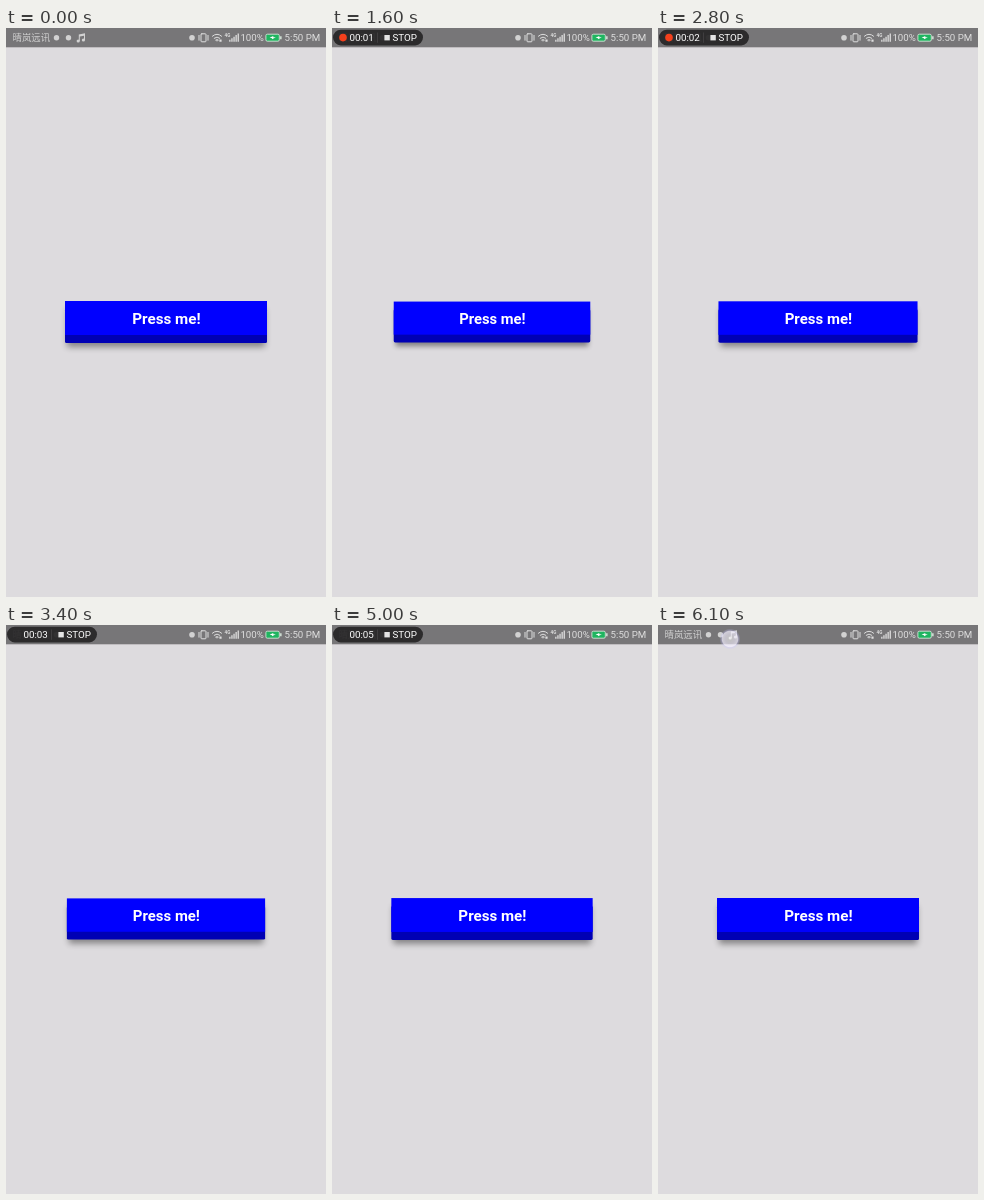
Recreate the animation shown at these times as an HTML page. Size 320 px wide and 569 px high, loop 6200 ms.

```html
<!DOCTYPE html>
<html lang="en">
<head>
<meta charset="utf-8">
<title>Press me</title>
<style>
  html, body { margin: 0; width: 100%; height: 100%; overflow: hidden; background: #dddbde; }
  svg { display: block; width: 100vw; height: 100vh; }
  text { font-family: Roboto, sans-serif; }
  .status { font-size: 9.7px; fill: #dedede; }
  .carrier { font-family: "Noto Sans CJK SC", "Noto Sans CJK", sans-serif; font-size: 9.4px; fill: #d2d2d2; }
  .line { fill: none; stroke: #dedede; stroke-width: 1; stroke-linecap: round; }
  .pill text { font-size: 9.8px; fill: #fff; }
  .label { font-size: 15.2px; font-weight: 700; fill: #fff; text-anchor: middle; }
</style>
</head>
<body>
<svg viewBox="0 0 320 569" preserveAspectRatio="none">
  <defs>
    <filter id="soft" x="-10%" y="-50%" width="120%" height="200%">
      <feGaussianBlur stdDeviation="3"/>
    </filter>
    <radialGradient id="glow">
      <stop offset="0" stop-color="#fff" stop-opacity=".55"/>
      <stop offset=".45" stop-color="#f4f0ff" stop-opacity=".62"/>
      <stop offset=".74" stop-color="#f4f0ff" stop-opacity=".72"/>
      <stop offset=".84" stop-color="#c8c4ff" stop-opacity=".3"/>
      <stop offset="1" stop-color="#c8c4ff" stop-opacity="0"/>
    </radialGradient>
  </defs>

  <rect width="320" height="569" fill="#dddbde"/>

  <g id="button">
    <rect id="shadow" x="61" y="281" width="198" height="38" fill="#000" opacity=".4" filter="url(#soft)"/>
    <rect x="59" y="281" width="202" height="34" rx="1.5" fill="#0000b4"/>
    <g id="face">
      <rect x="59" y="273" width="202" height="34" fill="#00f"/>
      <text class="label" x="160.4" y="296">Press me!</text>
    </g>
  </g>

  <rect width="320" height="19.3" fill="#777678"/>
  <text class="carrier" x="6.5" y="13.4">晴岚远讯</text>
  <g fill="#d2d2d2">
    <circle cx="50.5" cy="9.8" r="2.7"/>
    <circle cx="62.5" cy="9.8" r="2.7"/>
    <circle cx="72.2" cy="13" r="1.6"/>
    <circle cx="77.4" cy="12" r="1.6"/>
    <path d="M72.8 6.4 79 5.2V12H78V7.8L73.8 8.6V13H72.8Z"/>
    <circle cx="186" cy="9.8" r="2.8"/>
  </g>
  <g class="line">
    <rect x="195" y="5.8" width="5" height="8" rx=".8"/>
    <path d="M193 7.4V12.2M202 7.4V12.2"/>
    <path d="M206.4 8.2Q211 4.2 215.6 8.2M208.2 10.2Q211 7.8 213.8 10.2M209.7 12Q211 11 212.3 12"/>
  </g>
  <path d="M210 12.3H212L211 13.8ZM213.4 11.5H215.6V13.7H213.4Z" fill="#dedede"/>
  <text class="status" x="218.6" y="8.8" style="font-size:4.6px;font-weight:700">4G</text>
  <path d="M223.2 13.8V11.8H224.5V13.8ZM225.3 13.8V10.3H226.6V13.8ZM227.4 13.8V8.7H228.7V13.8ZM229.5 13.8V7.1H230.8V13.8ZM231.6 13.8V5.5H232.9V13.8Z" fill="#dedede"/>
  <text class="status" x="234.4" y="13.2">100%</text>
  <rect x="259.9" y="6.2" width="13.4" height="7" rx="1.4" fill="#1fb560" stroke="#d5e6da" stroke-width=".9"/>
  <path d="M274.1 8.2H275.6V11.2H274.1Z" fill="#d5e6da"/>
  <path d="M263.6 9.8 267.3 8.1V9.2H269.8L266.1 11.3V10.2Z" fill="#fff"/>
  <text class="status" x="278.6" y="13.2">5:50 PM</text>

  <g id="pill" class="pill">
    <rect x="1" y="1.8" width="90" height="15.6" rx="7.8" fill="#262526" opacity=".92"/>
    <circle id="dot" cx="11" cy="9.6" r="3.8" fill="#f4401c"/>
    <text id="clock" x="17.4" y="13.2">00:00</text>
    <path d="M45.5 4.5V14.8" stroke="#464546" stroke-width=".8"/>
    <rect x="52.4" y="7" width="5.4" height="5.4" fill="#e4e4e4"/>
    <text x="60.4" y="13.2">STOP</text>
  </g>

  <circle id="touch" r="10.5" fill="url(#glow)"/>
</svg>
<script>
const LOOP = 6200, TRAVEL = 8, EASE_MS = 100;
const PILL = [300, 6000];
// times at which the breathing button is widest
const PEAKS = [0, 1130, 2070, 3060, 4150, 5110, 6110, 7110];
const TOUCHES = [
  { from: 1950, to: 2500, x: 229, y: 292, press: true },
  { from: 5250, to: 5700, x: 222, y: 299, press: true },
  { from: 5900, to: 6200, x: 72, y: 14 }
];

const $ = id => document.getElementById(id);
const show = (el, on) => el.setAttribute("visibility", on ? "visible" : "hidden");
const clamp = v => Math.max(0, Math.min(1, v));
const inside = (t, from, to) => t >= from && t < to;

function breath(t) {
  const i = PEAKS.findIndex(p => p > t) - 1;
  const phase = (t - PEAKS[i]) / (PEAKS[i + 1] - PEAKS[i]);
  return 0.9865 + 0.0135 * Math.cos(2 * Math.PI * phase);
}

function pressDepth(t) {
  return TOUCHES.filter(p => p.press).reduce((depth, p) =>
    Math.max(depth, clamp((t - p.from) / EASE_MS) - clamp((t - p.to) / EASE_MS)), 0);
}

function draw(t) {
  const depth = pressDepth(t);
  $("button").setAttribute("transform",
    `translate(160 294) scale(${breath(t)}) translate(-160 -294)`);
  $("face").setAttribute("transform", `translate(0 ${TRAVEL * depth})`);
  $("shadow").setAttribute("opacity", 0.4 * (1 - depth));

  const recording = inside(t, ...PILL);
  show($("pill"), recording);
  show($("dot"), recording && t % 1000 >= 500);
  $("clock").textContent = "00:0" + Math.floor(t / 1000);

  const touch = TOUCHES.find(p => inside(t, p.from, p.to));
  show($("touch"), touch);
  if (touch) {
    $("touch").setAttribute("cx", touch.x);
    $("touch").setAttribute("cy", touch.y);
  }
}

const start = performance.now();
function tick() {
  draw((performance.now() - start) % LOOP);
  requestAnimationFrame(tick);
}
tick();
</script>
</body>
</html>
```
